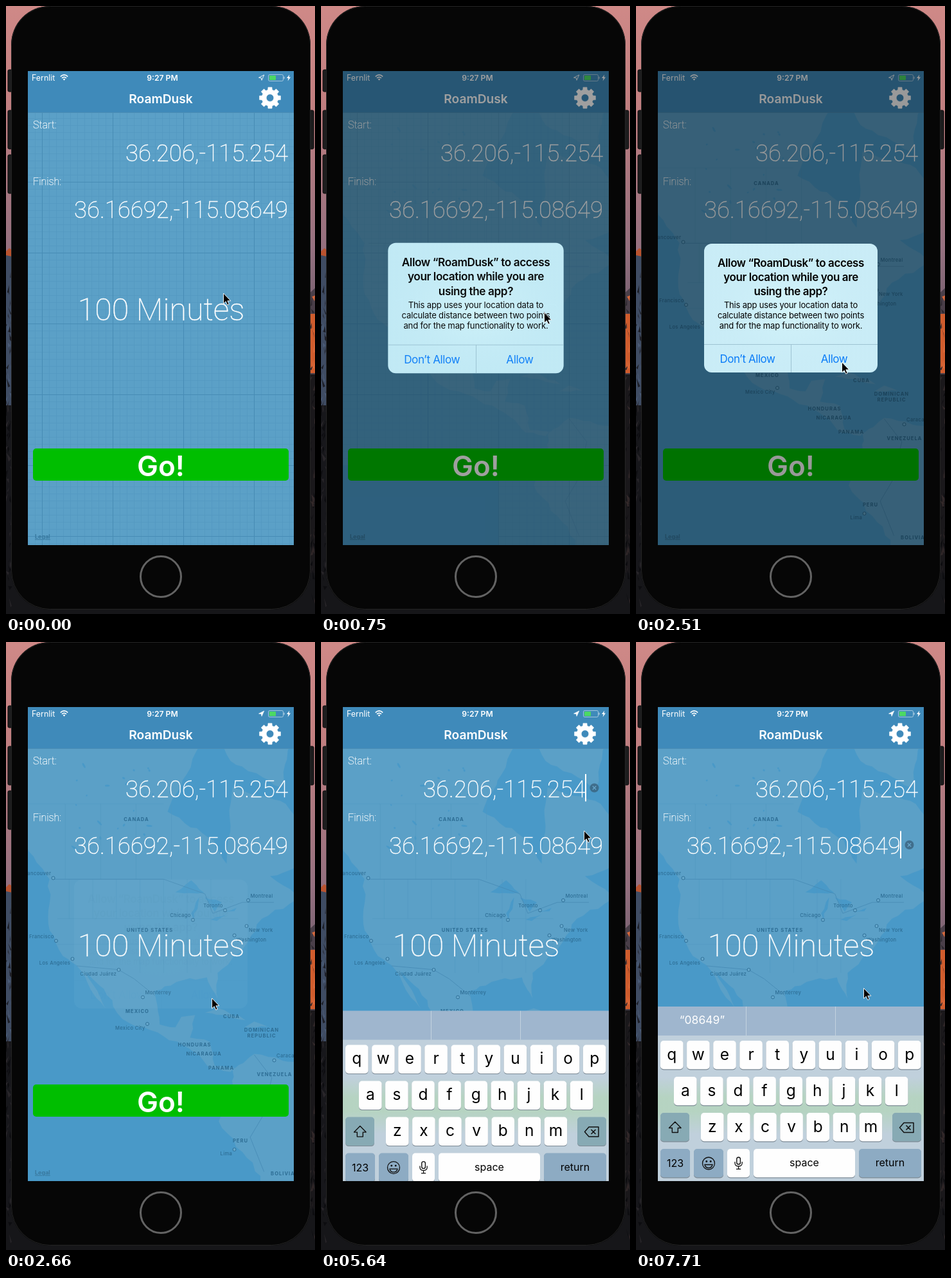
Write an HTML page that moves like this. It is 481 px wide and 944 px high and loops after 8000 ms.

```html
<!DOCTYPE html>
<html lang="en">
<head>
<meta charset="utf-8">
<title>Phone demo</title>
<style>
html, body { margin: 0; width: 100%; height: 100%; overflow: hidden; background: #111; }
svg { display: block; width: 481px; height: 944px; }
text { font-family: Inter, "Noto Sans", sans-serif; fill: #fff; white-space: pre; }
.thin { font-family: Roboto, "Open Sans", sans-serif; font-weight: 100; stroke: #fff; stroke-width: .45px; }
.num { font-size: 36.5px; text-anchor: end; }
.small { font-size: 16px; stroke-width: .25px; }
.mid { text-anchor: middle; }
.dark text { fill: #000; }
#labels text { fill: #2d6d94; font-size: 7.6px; font-weight: 500; letter-spacing: .35px; }
#labels .land { font-weight: 700; letter-spacing: 1px; text-anchor: middle; }
#labels .end { text-anchor: end; }
.title { font-size: 17px; font-weight: 600; letter-spacing: -.4px; }
.body { font-size: 13px; letter-spacing: -.2px; }
.dark .btn { font-size: 17px; letter-spacing: -.45px; fill: #0a7cf8; }
.key { font-size: 16px; }
</style>
</head>
<body>
<svg id="stage" viewBox="0 0 481 944" xmlns="http://www.w3.org/2000/svg"></svg>
<script>
const LOOP = 8000, STEP = 148.15;
const rect = (x, y, w, h, fill, r = 0, more = '') =>
  `<rect x="${x}" y="${y}" width="${w}" height="${h}" rx="${r}" fill="${fill}" ${more}/>`;
const text = (x, y, s, cls = '', more = '') => `<text x="${x}" y="${y}" class="${cls}" ${more}>${s}</text>`;
const path = (d, more = '') => `<path d="${d}" ${more}/>`;
const line = (d, color, w = 1, more = '') => path(d, `fill="none" stroke="${color}" stroke-width="${w}" ${more}`);
const repeat = (n, f) => Array.from({ length: n }, (_, i) => f(i)).join('');

let seed = 7;
const random = () => (seed = seed * 16807 % 2147483647) / 2147483647;
const spread = size => (random() - .5) * size;

// Mercator map
const place = (lon, lat) =>
  [374 + 6.126 * (lon + 74), 713.6 - 351 * Math.log(Math.tan(Math.PI / 4 + lat * Math.PI / 360))];
const parse = s => s.trim().split(/\s+/).map(p => place(...p.split(',').map(Number)));
const join = pts => 'M' + pts.map(p => p.map(v => v.toFixed(1)).join(' ')).join('L');

// key points of a coast, roughened in between
function coast(s) {
  const pts = parse(s), out = [];
  pts.forEach(([x, y], i) => {
    const [u, v] = pts[(i + 1) % pts.length], d = Math.hypot(u - x, v - y), n = Math.ceil(d / 12);
    for (let k = 0; k < n; k++) {
      const wobble = k ? Math.min(5, d / 8) : 0;
      out.push([x + (u - x) * k / n + spread(wobble), y + (v - y) * k / n + spread(wobble)]);
    }
  });
  return path(join(out) + 'Z');
}
const north = `-140,72 -140,60 -131,55 -124,49 -124.3,41 -120.6,34.6 -117.2,32.7 -112.2,25.5 -109.8,23 -114.7,31.3
 -109.4,26 -105.5,20.5 -94.8,16.2 -85.8,11.5 -83,8.3 -78,7.5 -77,8.6 -82,9 -83.3,15 -88.3,16 -87,21.4 -90.5,21
 -92,18.5 -96,19.2 -97.4,27 -90,29.4 -84,30 -81.3,25.3 -81.3,31 -75.6,35.3 -70,42 -60,46 -68,49.5 -55,52 -64,60
 -77.5,62 -79,51.5 -82.2,55 -94,59 -86,66.5 -90,72`;
const south = '-77.5,8 -72,12 -61.5,10 -50,0 -50,-25 -70,-25 -70.4,-18.5 -81,-5 -77.3,3.5';
const islands = ['-84.5,22 -81,23 -74.2,20.2 -78,20.8', '-74.4,18.5 -72,19.9 -68.5,18.6', '-78,65 -65,62 -60,72 -85,72'];
const lakes = ['-92,46.8 -88,48.8 -84.7,46.7', '-88,43 -86,45.9 -87.3,41.7', '-84.5,45.9 -80.2,45 -82,43.3',
  '-83,41.8 -79,42.8 -81.5,41.6', '-79.7,43.3 -76.5,44 -77,43.4'];
const border = s => line(join(parse(s)), '#468ab4', .8);
const meridian = i => border0([-119 + 6 * i, 49], [-119 + 6 * i, i < 3 ? 42 : 31]);
const border0 = (a, b) => line(join([place(...a), place(...b)]), '#5197c0', .6);

const world = () => `${rect(34, 101, 414, 736, '#4999c8')}
 <g fill="#5ba0c7">${[north, south, ...islands].map(coast).join('')}</g>
 <g fill="#4999c8">${lakes.map(coast).join('')}
 ${repeat(22, () => {
    const [x, y] = place(-108 + spread(26), 59 + spread(12));
    return `<ellipse cx="${x}" cy="${y}" rx="${1 + 5 * random() ** 3}" ry="1.5" transform="rotate(${spread(160)} ${x} ${y})"/>`;
  })}</g>
 ${repeat(7, meridian)}${repeat(2, i => border0([-122, 42 - 5 * i], [-76, 42 - 5 * i]))}
 ${repeat(4, i => border0([-120 + 9 * i, 60], [-120 + 9 * i, 49]))}${border0([-135, 60], [-95, 60])}
 ${border('-123,49 -95,49 -84.5,46.5 -82.5,43 -75,45 -67,45')}${border('-117.1,32.5 -106.5,31.7 -102.5,29.7 -97.2,25.9')}
 ${border('-72,11.8 -67.5,6 -70,-4 -73,-9 -69.5,-17.5')}`;

// name, dot, side of the label: left or right, up or down
const cities = [
  ['Vancouver', 73.5, 366.5, 'LU'], ['San Francisco', 78, 464, 'LU'], ['Los Angeles', 103.5, 492, 'LD'],
  ['Ciudad Juárez', 175.5, 509, 'LD'], ['Monterrey', 213, 551.5, 'RU'], ['Mexico City', 220, 593, 'LD'],
  ['Chicago', 291, 431.5, 'LU'], ['Toronto', 341, 416.5, 'LU'], ['Montreal', 377, 401, 'RU'],
  ['New York', 374.5, 441, 'RD'], ['Washington', 355.5, 455.5, 'RD'], ['Caracas', 417.5, 649.5, 'RU'], ['Lima', 355.5, 788, 'LD']];
const countries = [
  ['CANADA', 203, 278], ['UNITED STATES', 224, 450], ['MEXICO', 204.5, 576], ['CUBA', 351, 583.5],
  ['DOMINICAN', 398, 605], ['REPUBLIC', 398, 614], ['HONDURAS', 293.5, 627.5], ['NICARAGUA', 308, 642],
  ['PANAMA', 335, 664], ['VENEZUELA', 418, 674], ['PERU', 365, 777], ['BOLIVIA', 431, 828]];
const labels = () => countries.map(([s, x, y]) => text(x, y, s, 'land')).join('') +
  cities.map(([s, x, y, [side, level]]) =>
    `<circle cx="${x}" cy="${y}" r="2.5" fill="#66a8cc" stroke="#2f6f97"/>` +
    text(x + (side === 'L' ? -3.3 : 3.5), y + (level === 'U' ? -4.3 : 9), s, side === 'L' ? 'end' : '')).join('');

const grid = (from, gap) => repeat(Math.ceil(700 / gap), i =>
  `M${from + i * gap + .5} 166V837M34 ${from + i * gap + 107.5}H448`);

function gear() {
  const edge = [[-.26, 12.8], [-.18, 16.7], [.18, 16.7], [.26, 12.8]];
  const ring = repeat(8, i => edge.map(([a, r]) => {
    const q = i * Math.PI / 4 + a;
    return `L${411 + r * Math.sin(q)} ${142.6 - r * Math.cos(q)}`;
  }).join(''));
  return path('M' + ring.slice(1) + 'ZM416.8 142.6a5.8 5.8 0 1 0-11.6 0a5.8 5.8 0 1 0 11.6 0Z',
    'fill="#fff" fill-rule="evenodd" stroke="#fff" stroke-width=".6" stroke-linejoin="round"');
}

const flecks = (n, x, y, h, colors) => repeat(n, i => {
  const a = x + 8 * random(), b = y + h * random();
  return path(`M${a} ${b}l${spread(8)} ${6 + 9 * random()} ${spread(8)} ${-3 + spread(8)}Z`, `fill="${colors[i % colors.length]}"`);
});
const wallpaper = () => `${rect(0, 0, 481, 944, 'url(#sky)')}
 ${path('M0 383L5 377 14 384V944H0Z', 'fill="#3f4c63"')}${path('M0 381L5 376 14 382V390L0 387Z', 'fill="#b9532f"')}
 ${flecks(36, 0, 400, 230, ['#1d1f28', '#4b5c78', '#272a35'])}
 ${path('M468 450L481 438V944H468Z', 'fill="#4a3f49"')}${rect(468, 478, 13, 92, '#cf5c2d')}
 ${flecks(14, 473, 440, 125, ['#2a262d', '#d9683a'])}
 ${rect(0, 620, 20, 324, '#17171b')}${rect(461, 572, 20, 372, '#1a181b')}${rect(0, 880, 481, 64, '#161619')}
 ${flecks(40, 0, 610, 320, ['#0d0d10', '#29262a'])}${flecks(40, 473, 575, 350, ['#0d0d10', '#33292a'])}`;

const button = (x, y, h) => rect(x, y, 7, h, '#1d1d1e', 2, 'stroke="#0b0b0b"');
const phone = () => button(3, 99, 34) + button(3, 162, 60) + button(3, 231, 60) + button(472, 162, 60) +
  rect(8, 0, 466, 937, '#060606', 60) + rect(8.5, .5, 465, 936, 'none', 60, 'stroke="#242424"') +
  '<circle cx="241" cy="886" r="31.5" fill="none" stroke="#636363" stroke-width="3"/>';

const status = () => text(40, 115.5, 'Fernlit', '', 'font-size="12.4"') +
  text(243.5, 115.5, '9:27 PM', 'mid', 'font-size="12.2" font-weight="600"') +
  line('M84.8 109.6Q90.5 104.2 96.2 109.6M87 112Q90.5 108.8 94 112', '#fff', 1.6) +
  path('M88.7 113.6Q90.5 112 92.3 113.6L90.5 115.8Z', 'fill="#fff"') +
  path('M393.5 111.2L401.8 107 398 115.3 397.4 111.8Z', 'id="pin" stroke="#fff" stroke-linejoin="round"') +
  rect(408.5, 106.5, 23, 10, 'none', 2, 'stroke="#fff" stroke-opacity=".5"') + rect(410, 108, 10, 7, '#4cd964', .5) +
  rect(432.3, 109.5, 1.4, 4, '#fff', .7, 'opacity=".5"') + path('M441.3 106.5L437 112H439.6L438.6 116.5 443 110.6H440.3Z', 'fill="#fff"');

const editMark = (id, y) => `<g id="${id}"><circle cx="425.5" cy="${y}" r="7" fill="#39627d" opacity=".8"/>
 ${line(`M422.8 ${y - 2.7}l5.4 5.4m0-5.4l-5.4 5.4`, '#68a6cb', 1.3)}
 ${rect(411, y - 21.5, 2, 42.5, '#fff', 0, `id="${id}Caret"`)}</g>`;

const lines = (y, gap, cls, list) => list.map((s, i) => text(241, y + gap * i, s, 'mid ' + cls)).join('');
const alertBox = () => `<g id="alert">
 ${rect(106, 369, 270, 200, '#caedf7', 12, 'id="panel"')}${rect(106, 369, 270, 200, 'url(#glow)', 12)}
 <g id="words" class="dark">
 ${lines(405, 22, 'title', ['Allow “RoamDusk” to access', 'your location while you are', 'using the app?'])}
 ${lines(469, 16, 'body', ['This app uses your location data to', 'calculate distance between two points', 'and for the map functionality to work.'])}
 ${line('M106 525.5H376M241.5 525.5V569', '#93b9c9', .8)}
 ${text(173.5, 553.5, 'Don’t Allow', 'mid btn')}${text(308.5, 553.5, 'Allow', 'mid btn')}</g></g>`;

const key = (x, y, w, fill = '#fefefe') => rect(x, y + 1, w, 44.5, '#7d8a95', 5) + rect(x, y, w, 44.3, fill, 5);
const keyRow = (s, x, y) => [...s].map((c, i) =>
  key(x + 41.1 * i, y, 35.6) + text(x + 41.1 * i + 17.8, y + 29.5, c, 'mid', 'font-size="24.5"')).join('');
const keyboard = () => `<g id="keyboard" class="dark" clip-path="url(#kbClip)">
 ${rect(34, 566, 414, 271, '#c0d0dc')}${rect(34, 566, 414, 45, '#9fb6ce')}
 <g id="tint">${rect(34, 676, 414, 88, 'url(#green)')}</g>
 ${line('M171.5 566V611M310.5 566V611', '#c3d2df')}
 <text id="hint" x="103" y="593" class="mid" font-size="17.5" style="fill:#fff">“08649”</text>
 ${keyRow('qwertyuiop', 38, 619)}${keyRow('asdfghjkl', 59, 675)}${keyRow('zxcvbnm', 101, 731)}
 ${key(38, 731, 45, '#87aab4')}${key(399, 731, 45, '#87aab4')}
 ${key(38, 787, 46, '#8dabc3')}${key(90, 787, 46, '#8dabc3')}${key(142, 787, 35)}${key(183, 787, 158)}${key(347, 787, 97, '#8dabc3')}
 ${text(61, 815, '123', 'mid key')}${text(262, 814, 'space', 'mid key')}${text(395.5, 814, 'return', 'mid key')}
 ${line('M60.8 745L51.5 754.5H56.3V761.5H65.3V754.5H70.1Z', '#111', 1.4, 'stroke-linejoin="round"')}
 ${line('M410.5 754L417 746.5H432V761.5H417ZM420.5 750.5l7 7m0-7l-7 7', '#111', 1.5, 'stroke-linejoin="round"')}
 ${line('M122.5 809.5a9.5 9.5 0 1 0-19 0a9.5 9.5 0 1 0 19 0ZM107 811.5H119Q118 816.5 113 816.5T107 811.5Z', '#111', 1.3)}
 <circle cx="109.8" cy="806.5" r="1.4"/><circle cx="116.2" cy="806.5" r="1.4"/>
 ${rect(156.8, 800, 5.6, 11, 'none', 2.8, 'stroke="#111" stroke-width="1.4"')}
 ${line('M154 807V809Q154 814 159.6 814T165.2 809V807M159.6 814V818M156 818.3H163.2', '#111', 1.3)}</g>`;

const stop = (at, color, alpha = 1) => `<stop offset="${at}" stop-color="${color}" stop-opacity="${alpha}"/>`;
const fade = (id, ...stops) => `<linearGradient id="${id}" x1="0" y1="0" x2="0" y2="1">${stops.join('')}</linearGradient>`;
const clip = (id, y, h) => `<clipPath id="${id}">${rect(34, y, 414, h, '#000')}</clipPath>`;

const stage = document.getElementById('stage');
stage.innerHTML = `<defs>
 ${fade('sky', stop(0, '#cf8987'), stop(.15, '#c27f80'), stop(.4, '#94707f'), stop(.6, '#5a5061'))}
 ${fade('green', stop(0, '#b4d4bd', 0), stop(.35, '#b4d4bd', .85), stop(.6, '#b4d4bd', .85), stop(1, '#b4d4bd', 0))}
 <radialGradient id="glow">${stop(0, '#dcfbfd', .55)}${stop(1, '#c4e6f4', .1)}</radialGradient>
 ${clip('screen', 101, 736)}${clip('kbClip', 566, 271)}</defs>
 ${wallpaper()}${phone()}
 <g clip-path="url(#screen)">
 ${rect(34, 101, 414, 736, '#5ba0c7')}
 ${line(grid(34, 11), '#5499c1', .7)}${line(grid(56, 110), '#478cb5')}
 ${rect(34, 713, 242, 124, '#4999c8', 0, 'id="tile"')}
 <g id="map">${world()}</g><g id="labels">${labels()}</g>
 ${text(45, 827, 'Legal', '', 'font-size="9" font-weight="700" style="fill:#39799f;text-decoration:underline"')}
 ${rect(34, 101, 414, 64.5, '#3f8aba')}${rect(34, 165, 414, 1, '#4a8db5')}
 ${status()}${text(241, 150.5, 'RoamDusk', 'mid', 'font-size="19.2" font-weight="600"')}${gear()}
 ${text(42, 189.5, 'Start:', 'thin small')}${text(42, 277.5, 'Finish:', 'thin small')}
 ${text(439, 240.5, '36.206,-115.254', 'thin num', 'id="from"')}
 ${text(439, 328.5, '36.16692,-115.08649', 'thin num', 'id="to"')}
 ${editMark('fromEdit', 226.5)}${editMark('toEdit', 315)}
 ${text(241.5, 487.5, '100 Minutes', 'thin mid', 'font-size="48.5"')}
 ${rect(42, 687, 398, 50, '#00be00', 5)}${text(241, 730, 'Go!', 'mid', 'font-size="44" font-weight="600"')}
 ${rect(34, 101, 414, 736, '#000', 0, 'id="dim"')}${alertBox()}${keyboard()}</g>
 ${path('M0 0V16L3.7 12.7 6.2 18.2 8.7 17.1 6.3 11.8H11.3Z', 'id="pointer" fill="#000" stroke="#fff" stroke-width=".9"')}`;

const el = {};
stage.querySelectorAll('[id]').forEach(n => el[n.id] = n);
const set = (id, name, value) => el[id].setAttribute(name, value);
const show = (id, on) => set(id, 'opacity', +on);
const within = (t, a, b) => t >= a && t < b;
const clamp = v => Math.min(1, Math.max(0, v));
// critically damped spring: what is left of the way
const left = (dt, speed) => dt <= 0 ? 1 : (1 + speed * dt) * Math.exp(-speed * dt);

// pointer moves: start, end, x, y
const moves = [[148, 593, 348.5, 473], [593, 1926, 322.5, 556], [1926, 2370, 320.5, 553], [3852, 4889, 420.5, 221],
  [5186, 5630, 409.5, 293], [5630, 6222, 408, 313], [6519, 7556, 354.5, 537.5]];
function pointerAt(t) {
  let x = 338.5, y = 446;
  for (const [a, b, u, v] of moves) {
    const k = clamp((t - a) / (b - a)), e = k * k * (3 - 2 * k);
    x += (u - x) * e;
    y += (v - y) * e;
  }
  return `translate(${x.toFixed(2)} ${y.toFixed(2)})`;
}

function draw(time) {
  const t = Math.floor((time + 8) / STEP) * STEP;

  const p = 1 - left(t - 469, .0165), seen = t < 2800 ? left(t - 2560, .045) : 0;
  set('dim', 'opacity', .4 * p * seen * seen);
  set('alert', 'opacity', seen * clamp(p * 1.55));
  set('alert', 'transform', `translate(241 469) scale(${1 + .2 * (1 - p)}) translate(-241 -469)`);
  set('panel', 'fill', `rgb(${92 + 110 * p},${224 + 13 * p},247)`);
  set('panel', 'opacity', .8 + .2 * p);
  set('words', 'opacity', (.15 + .85 * p) * Math.sqrt(seen));
  set('pin', 'fill', t > 2600 ? '#fff' : 'none');
  set('pin', 'stroke-width', t > 2600 ? .6 : .9);

  show('tile', t > 580);
  show('map', clamp((t - 593) / 300));
  show('labels', t > 2200);

  const first = within(t, 5320, 6500), second = t > 6500;
  set('from', 'x', first ? 412 : 439);
  set('to', 'x', second ? 412 : 439);
  show('fromEdit', first);
  show('toEdit', second);
  show('fromEditCaret', !within(t, 6060, 6200));
  show('toEditCaret', !within(t, 7390, 7690));
  show('hint', t > 6650);

  const drop = 271 * left(t - 5290, .0165);
  set('keyboard', 'transform', `translate(0 ${drop.toFixed(2)})`);
  set('tint', 'transform', `translate(0 ${(-drop).toFixed(2)})`);
  show('keyboard', t > 5290);
  set('pointer', 'transform', pointerAt(t));
}

const begin = performance.now();
function tick() {
  draw((performance.now() - begin) % LOOP);
  requestAnimationFrame(tick);
}
tick();
</script>
</body>
</html>
```
